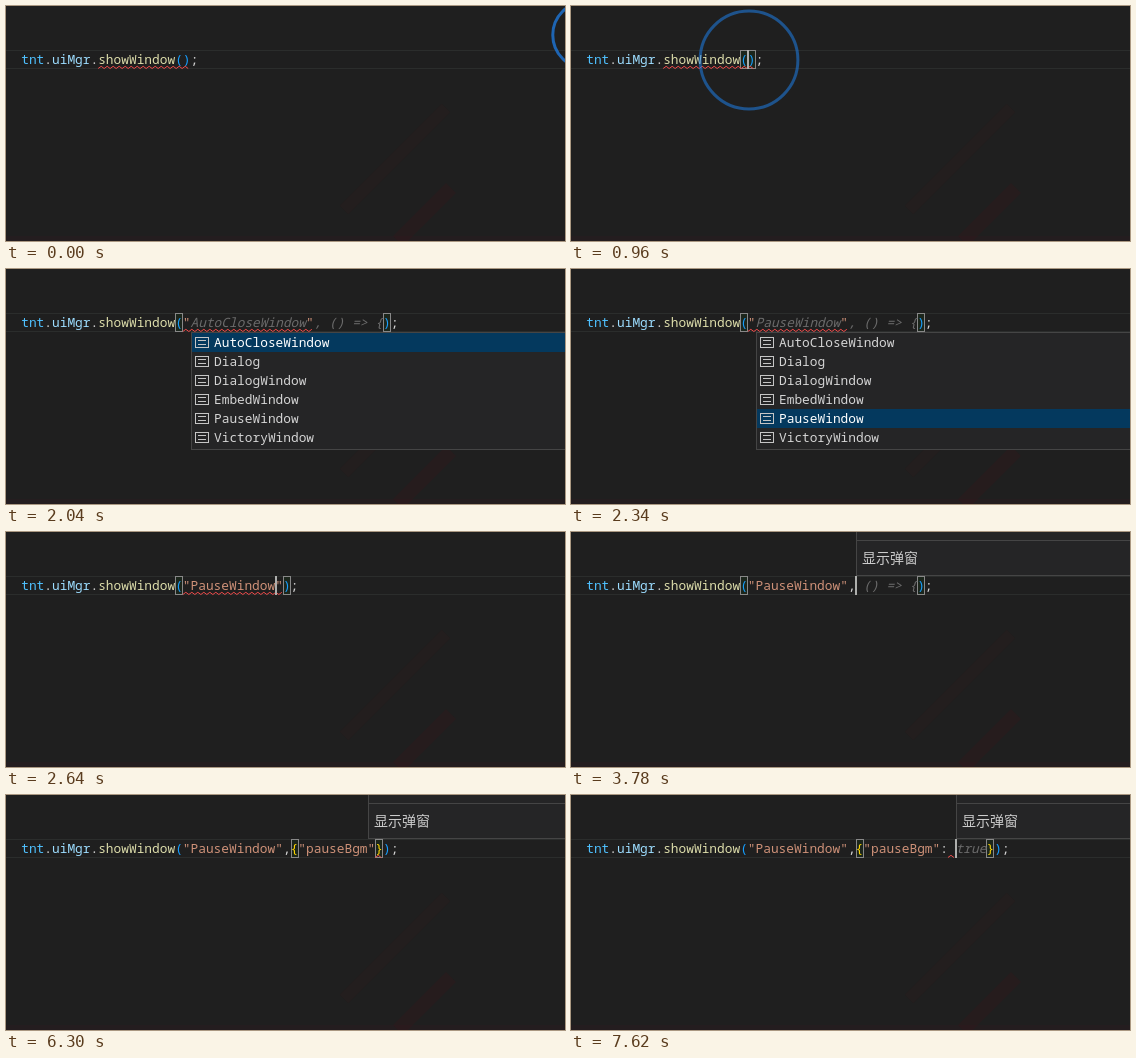
An HTML page with a canvas that plays this animation: 559x235 px, repeating every 8000 ms.

```html
<!DOCTYPE html>
<html lang="en">
<head>
<meta charset="utf-8">
<title>Code completion</title>
<style>
  html, body { margin: 0; width: 100%; height: 100%; overflow: hidden; background: #1f1f1f; }
  canvas { display: block; }
</style>
</head>
<body>
<canvas id="stage" width="559" height="235"></canvas>
<script>
const ctx = document.getElementById('stage').getContext('2d');
const W = 559, H = 235, LOOP = 8000, STEP = 60;
const LEFT = 15.2, CHAR = 7.697, TOP = 44, ROW = 19;
const CODE_FONT = '12.83px "Noto Sans Mono", "DejaVu Sans Mono", monospace';
const LABEL_FONT = '14px "Noto Sans CJK SC", "Noto Sans CJK", sans-serif';
const ARGS_AT = 21;
const RING_LIFE = 400;

const color = {
  back: '#1f1f1f', widget: '#252526', border: '#454545', selected: '#04395e',
  object: '#4fc1ff', member: '#9cdcfe', method: '#dcdcaa', plain: '#d4d4d4',
  string: '#ce9178', paren: '#179fff', brace: '#ffd700', ghost: '#6b6b6b', error: '#f14c4c'
};
const windows = ['AutoCloseWindow', 'Dialog', 'DialogWindow', 'EmbedWindow', 'PauseWindow', 'VictoryWindow'];
const rings = [{ x: 580, y: 29, start: -116 }, { x: 178, y: 54, start: 768 }];

// Text between tildes is an inline suggestion.
const suggest = name => `"~${name}~"~, () => {~`;

// Each entry changes only the listed parts of the editor state.
const timeline = [
  [0, { args: '', caret: null, box: null, squiggle: [10, 22], list: null, selected: 0, panel: null }],
  [780, { caret: 21, box: 'paren' }],
  [1260, { caret: null }],
  [1560, { args: '""', caret: 22, squiggle: [10, 24], list: 'windows' }],
  [1860, { squiggle: [21, 23] }],
  [1980, { args: suggest(windows[0]), squiggle: [21, 38] }],
  [2040, { caret: null }],
  [2220, { args: suggest(windows[5]), selected: 5, squiggle: [21, 36] }],
  [2340, { args: suggest(windows[4]), selected: 4, squiggle: [21, 34] }],
  [2520, { args: '"PauseWindow"', caret: 33, list: null, selected: 0 }],
  [2880, { caret: 34 }],
  [3000, { squiggle: null }],
  [3360, { caret: null }],
  [3660, { args: '"PauseWindow",', caret: 35 }],
  [3720, { panel: 35 }],
  [3780, { args: '"PauseWindow",~ () => {~' }],
  [4140, { caret: null }],
  [4560, { args: '"PauseWindow",{}', caret: 36, box: 'brace' }],
  [4680, { panel: 36 }],
  [5100, { args: '"PauseWindow",{""}', caret: 37, panel: 37 }],
  [5220, { list: 'keys' }],
  [5520, { args: '"PauseWindow",{"pauseBgm"}', caret: 45, list: null }],
  [5640, { panel: 45 }],
  [5880, { squiggle: [36, 46] }],
  [6180, { caret: null }],
  [6300, { squiggle: [46, 47] }],
  [6600, { caret: 46, panel: 46 }],
  [7080, { caret: null }],
  [7260, { args: '"PauseWindow",{"pauseBgm":}', caret: 47, squiggle: [47, 48] }],
  [7320, { panel: 47 }],
  [7560, { args: '"PauseWindow",{"pauseBgm": }', caret: 48 }],
  [7620, { args: '"PauseWindow",{"pauseBgm": ~true~}', panel: 48 }]
];

const stateAt = t => Object.assign({}, ...timeline.filter(([at]) => at <= t).map(entry => entry[1]));
const columnX = column => LEFT + column * CHAR;

function rect(x, y, w, h, fill) {
  ctx.fillStyle = fill;
  ctx.fillRect(x, y, w, h);
}

function text(string, x, y, fill, font = CODE_FONT) {
  ctx.font = font;
  ctx.fillStyle = fill;
  ctx.fillText(string, x, y);
}

function path(points, stroke, width = 1) {
  ctx.beginPath();
  points.forEach(([x, y]) => ctx.lineTo(x, y));
  ctx.strokeStyle = stroke;
  ctx.lineWidth = width;
  ctx.stroke();
}

function drawBackground() {
  rect(0, 0, W, H, color.back);
  path([[338, 204], [440, 102]], 'rgba(80,15,20,.08)', 12);
  path([[392, 235], [445, 182]], 'rgba(80,15,20,.15)', 14);
  rect(0, 230, W, 5, 'rgba(80,15,30,.1)');
  rect(0, TOP, W, 1, '#2b2d2c');
  rect(0, TOP + 18, W, 1, '#2b2d2c');
}

function drawBox(column) {
  const x = Math.round(columnX(column));
  rect(x, TOP, 8, ROW, 'rgba(0,100,0,.1)');
  ctx.strokeStyle = '#888';
  ctx.lineWidth = 1;
  ctx.strokeRect(x + .5, TOP + .5, 7, ROW - 1);
}

function argTokens(args) {
  const pieces = args.match(/~[^~]*~|"[^"~]*"?|[{}]|[^~"{}]+/g) || [];
  return pieces.map(piece => {
    if (piece[0] === '~') return [piece.slice(1, -1), color.ghost, true];
    if (piece[0] === '"') return [piece, color.string];
    return [piece, /[{}]/.test(piece) ? color.brace : color.plain];
  });
}

function drawCode(args, box) {
  const flat = args.replaceAll('~', '');
  if (box === 'paren') [ARGS_AT - 1, ARGS_AT + flat.length].forEach(drawBox);
  if (box === 'brace') [flat.indexOf('{'), flat.lastIndexOf('}')].forEach(i => drawBox(ARGS_AT + i));
  const tokens = [
    ['tnt', color.object], ['.', color.plain], ['uiMgr', color.member], ['.', color.plain],
    ['showWindow', color.method], ['(', color.paren], ...argTokens(args),
    [')', color.paren], [';', color.plain]
  ];
  let column = 0;
  for (const [string, fill, ghost] of tokens) {
    text(string, columnX(column), 58, fill, (ghost ? 'italic ' : '') + CODE_FONT);
    column += string.length;
  }
}

function drawSquiggle([from, to]) {
  const points = [];
  for (let x = columnX(from), i = 0; x <= columnX(to); x += 3, i++) points.push([x, i % 2 ? 60.3 : 62.5]);
  path(points, color.error);
}

function drawPanel(column) {
  const x = Math.round(columnX(column));
  rect(x, 0, W - x, 44, color.widget);
  rect(x, 0, 1, 44, color.border);
  rect(x, 43, W - x, 1, color.border);
  rect(x, 8, W - x, 1, color.border);
  text('显示弹窗', x + 6, 31, '#ccc', LABEL_FONT);
}

function drawWordIcon(x, y) {
  ctx.strokeStyle = '#c5c5c5';
  ctx.lineWidth = 1;
  ctx.strokeRect(x + .5, y + 4.5, 13, 10);
  rect(x + 3, y + 7, 8, 1, '#c5c5c5');
  rect(x + 3, y + 11, 8, 1, '#c5c5c5');
}

function drawCubeIcon(x, y) {
  const px = points => points.map(([a, b]) => [x + a, y + b]);
  path(px([[0, 7], [8, 3.5], [14, 6], [14, 12], [6, 16], [0, 13], [0, 7], [6, 9.5], [14, 6]]), '#fff', 1.2);
  path(px([[6, 9.5], [6, 16]]), '#fff', 1.2);
}

function drawList(items, x, selected, drawIcon) {
  const height = items.length * ROW + 4;
  rect(x, 63, W - x, height, color.widget);
  rect(x, 63, W - x, 1, color.border);
  rect(x, 62 + height, W - x, 1, color.border);
  rect(x + 1, 64 + selected * ROW, W - x, ROW, color.selected);
  rect(x, 63, 1, height, color.border);
  items.forEach((item, i) => {
    const y = 64 + i * ROW;
    drawIcon(x + 4, y);
    text(item, x + 23, y + 14, i === selected ? '#fff' : color.plain);
  });
}

function drawRing({ x, y, start }, t) {
  const p = (t - start) / RING_LIFE;
  if (p < 0 || p >= 1) return;
  ctx.beginPath();
  ctx.arc(x, y, 67 * (1 - (1 - p) ** 2), 0, Math.PI * 2);
  ctx.strokeStyle = `rgba(30,130,240,${1 - p})`;
  ctx.lineWidth = 3;
  ctx.stroke();
}

function draw(t) {
  const s = stateAt(t);
  drawBackground();
  drawCode(s.args, s.box);
  if (s.squiggle) drawSquiggle(s.squiggle);
  if (s.panel) drawPanel(s.panel);
  if (s.list === 'windows') drawList(windows, 185, s.selected, drawWordIcon);
  if (s.list === 'keys') drawList(['pauseBgm'], 300, 0, drawCubeIcon);
  if (s.caret) rect(Math.floor(columnX(s.caret)), TOP, 2, ROW, '#aeafad');
  rings.forEach(ring => drawRing(ring, t));
}

function tick() {
  const t = performance.now() % LOOP;
  draw(Math.floor(t / STEP) * STEP);
  requestAnimationFrame(tick);
}
tick();
</script>
</body>
</html>
```
